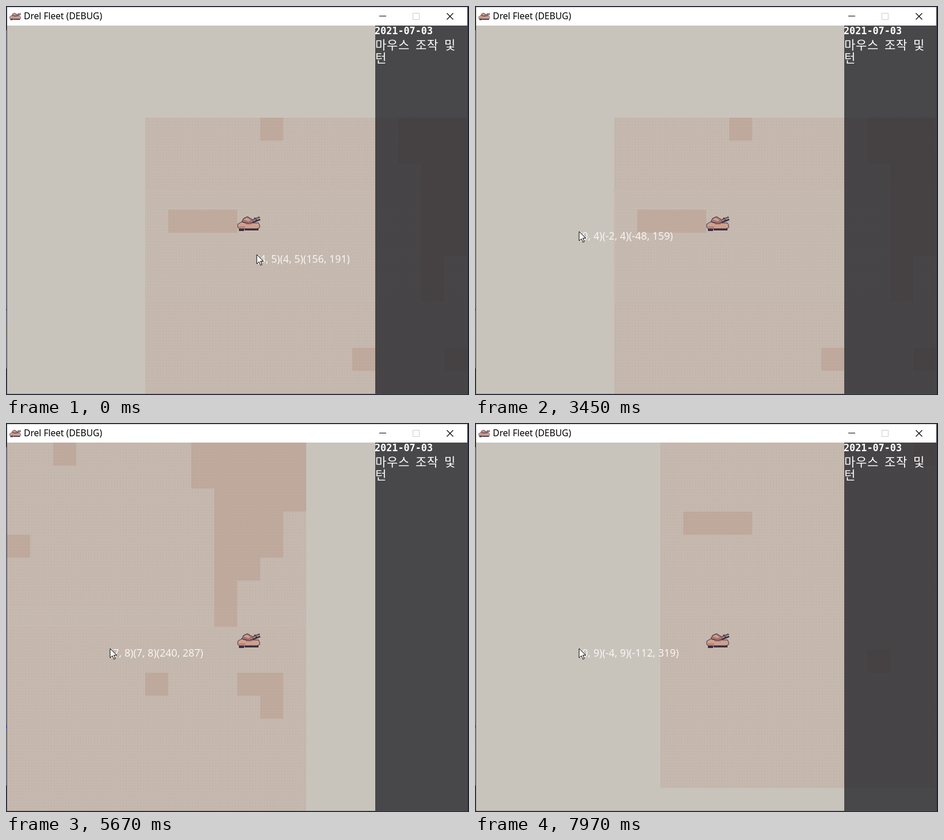
These frames come from a looping animation (805 px wide and 676 px high, 8 s). An HTML page with a canvas:

```html
<!DOCTYPE html>
<html lang="ko">
<head>
<meta charset="utf-8">
<style>
html, body { margin: 0; width: 100%; height: 100%; overflow: hidden; background: #20222e }
canvas { display: block }
</style>
</head>
<body>
<canvas id="stage" width="805" height="676"></canvas>
<script>
const ctx = document.getElementById('stage').getContext('2d');
const LOOP = 8000, TILE = 40, SRC = 32, SIZE = 16;

// Held arrow keys: press time, direction, tiles walked
const KEYS = [[3960, -1, 0, 1], [4260, -1, 0, 8], [5160, 0, -1, 9],
  [5970, 1, 0, 11], [6970, 0, 1, 5], [7970, 0, -1, 1]];

// Pointer path: time, x, y
const PATH = [[80, 437, 433], [850, 263, 408], [950, 260, 372], [1450, 200, 229],
  [1750, 184, 252], [2050, 159, 312], [2750, 175, 384], [3050, 182, 393]];

function rect(x, y, w, h, color) {
  ctx.fillStyle = color;
  ctx.fillRect(x, y, w, h);
}

function line(path, color, width = 1) {
  ctx.strokeStyle = color;
  ctx.lineWidth = width;
  ctx.stroke(new Path2D(path));
}

function shape(path, fill, ink) {
  ctx.fillStyle = fill;
  ctx.fill(new Path2D(path));
  if (ink) line(path, ink);
}

function text(str, x, y, font, color) {
  ctx.font = font;
  ctx.fillStyle = color;
  ctx.fillText(str, x, y);
}

function makeMap() {
  const map = document.createElement('canvas');
  map.width = map.height = SIZE * SRC;
  const g = map.getContext('2d');
  const checker = (x, y, w, h, a, b) => {
    const cell = document.createElement('canvas');
    cell.width = cell.height = 2;
    const c = cell.getContext('2d');
    c.fillStyle = a;
    c.fillRect(0, 0, 2, 2);
    c.fillStyle = b;
    c.fillRect(0, 0, 1, 1);
    c.fillRect(1, 1, 1, 1);
    g.fillStyle = g.createPattern(cell, 'repeat');
    g.fillRect(x * SRC, y * SRC, w * SRC, h * SRC);
  };
  const dark = (x, y, w, h) => checker(x, y, w, h, '#c6b4a8', '#b89f92');
  checker(0, 0, SIZE, SIZE, '#cdc6bd', '#bdaa9f');
  [2, 8, 6, 5, 3].forEach((h, i) => dark(11 + i, 0, 1, h));
  dark(5, 0, 1, 1);
  dark(1, 4, 3, 1);
  dark(9, 10, 1, 1);
  dark(13, 10, 2, 1);
  dark(14, 11, 1, 1);
  return map;
}
const map = makeMap();

function tank(x, y, scale) {
  const ink = '#3a2f40', skin = '#d0a08e', shade = '#a5746f';
  ctx.save();
  ctx.translate(x, y);
  ctx.scale(scale, scale);
  rect(3, 21, 9, 6, ink);
  rect(13, 22, 24, 4, ink);
  line('M25 9L39 3M27 12L40 7M30 4L34 9', ink, 2.5);
  shape('M1 15L8 11L14 13H37L39 17V21L35 23H4L1 21Z', skin, ink);
  shape('M8 11L11 5L18 2L26 7L28 12L20 14Z', shade, ink);
  shape('M11 7L17 4L23 8L20 10Z', skin);
  line('M26 9L38 4M3 20H14M15 15H25', shade, 1.5);
  ctx.restore();
}

// One step on press, then auto-repeat at 25 steps a second
function steps(t, total) {
  if (t < 0) return 0;
  const ticks = Math.max(0, Math.floor((t - 400) / 100));
  return Math.min(total, 1 + Math.ceil(ticks * 2.5));
}

function mapOrigin(t) {
  let x = 242, y = 194;
  for (const [start, dx, dy, total] of KEYS) {
    const n = steps(t - start, total) * TILE;
    x += dx * n;
    y += dy * n;
  }
  return [x, y];
}

function pointerAt(t) {
  const i = PATH.findIndex(p => p[0] > t);
  if (i < 0) return PATH.at(-1).slice(1);
  const b = PATH[i], a = PATH[i - 1] || b;
  const k = a === b ? 0 : (t - a[0]) / (b[0] - a[0]);
  return [1, 2].map(n => Math.round(a[n] + (b[n] - a[n]) * k));
}

function titleBar(active) {
  const ink = active ? '#000' : '#999';
  rect(2, 2, 800, 32, '#fff');
  tank(6, 11, 0.5);
  text('Drel Fleet (DEBUG)', 31, 23, '15.6px "Noto Sans", sans-serif', ink);
  rect(649, 17, 12, 1, ink);
  line('M707.5 12.5h11v11h-11z', active ? '#ccc' : '#ddd');
  line('M766.5 12.5l11 11m0 -11l-11 11', ink, 1.2);
}

function sidebar() {
  rect(642, 34, 160, 640, 'rgba(40,41,45,.8)');
  text('2021-07-03', 641, 49, 'bold 16.8px "DejaVu Sans Mono", monospace', '#fff');
  ['마우스 조작 및', '턴'].forEach((words, row) => {
    let x = 642;
    for (const ch of words) {
      text(ch, x, 74.5 + row * 23.5, '500 21px "Noto Sans Mono CJK KR", "Noto Sans CJK KR", sans-serif', '#fff');
      x += ch === ' ' ? 10 : 20;
    }
  });
}

function label([mx, my], ox, oy) {
  const world = [(mx - ox) * 4 / 5, (my - oy) * 4 / 5];
  const tile = world.map(v => Math.floor(v / SRC));
  const held = tile.map(v => Math.max(0, Math.min(SIZE - 1, v)));
  const str = [held, tile, world.map(Math.trunc)].map(p => `(${p.join(', ')})`).join('');
  text(str, mx - 1, my + 13, '17.8px "Noto Sans", sans-serif', '#f7f5f3');
}

function cursor([x, y]) {
  ctx.save();
  ctx.translate(x - 1, y - 1);
  shape('M0 0V16L4 12.5L6.5 18.5L9 17.5L6.5 11.5H11.5Z', '#fff', '#000');
  ctx.restore();
}

function draw(t) {
  const [ox, oy] = mapOrigin(t);
  const tick = Math.floor((t - 50) / 100) * 100 + 50;

  rect(0, 0, 805, 676, '#20222e');
  rect(0, 42, 1, 588, '#8a8a92');
  rect(0, 526, 1, 3, '#4a4ae0');
  rect(0, 562, 1, 3, '#d08030');
  rect(1, 1, 802, 674, '#4a4b52');

  ctx.save();
  ctx.beginPath();
  ctx.rect(2, 34, 800, 640);
  ctx.clip();
  rect(2, 34, 800, 640, '#c8c4bc');
  ctx.imageSmoothingEnabled = false;
  ctx.drawImage(map, ox, oy, SIZE * TILE, SIZE * TILE);
  tank(402, 364, 1);
  sidebar();
  label(pointerAt(tick), ox, oy);
  ctx.restore();

  titleBar(t < 500 || t >= 2650);
  // The system pointer runs slightly ahead of the label
  cursor(pointerAt(tick + 30));
}

function frame() {
  draw(performance.now() % LOOP);
  requestAnimationFrame(frame);
}
frame();
</script>
</body>
</html>
```
